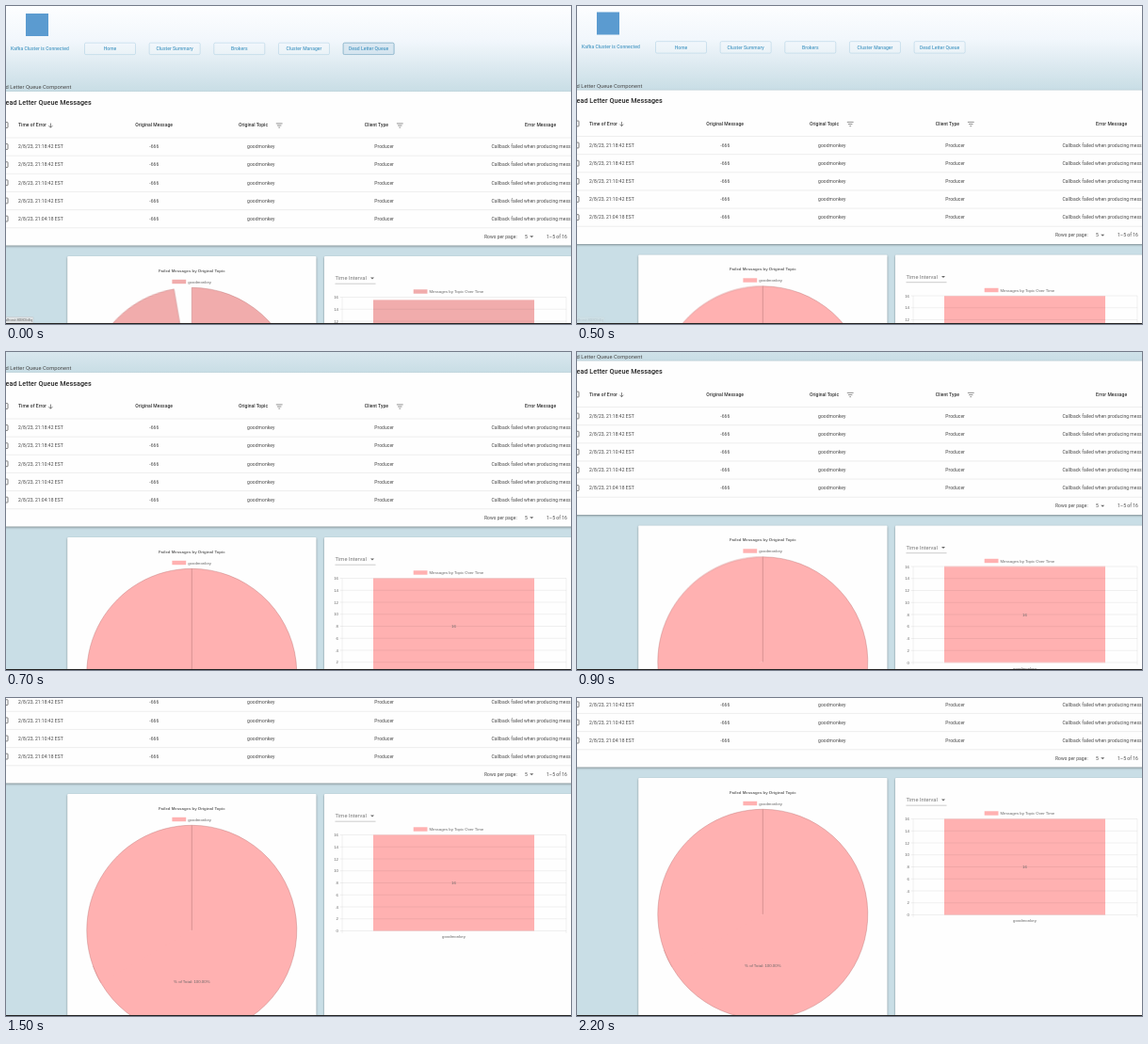
An HTML page for the animation above (4 s loop, 600 by 338 pixels).

```html
<!DOCTYPE html>
<html lang="en">
<head>
<meta charset="utf-8">
<title>Dead Letter Queue</title>
<style>
  html, body { margin: 0; width: 100%; height: 100%; overflow: hidden; background: #c9dee6; }
  svg { display: block; width: 100%; height: 100%; }
  text { font: 5px Roboto, sans-serif; letter-spacing: .04px; fill: #484848; }
  .strong { font-weight: 500; fill: #333; }
  .page-name { font-size: 5.78px; }
  .title { font-size: 7.23px; fill: #222; }
  .nav { fill: #4f9cc6; }
  .chart { font: 4.34px "Liberation Sans", Arial, sans-serif; letter-spacing: 0; fill: #666; }
  .chart.heading { font-weight: bold; }
  .select { font-size: 5.78px; letter-spacing: 0; fill: #777; }
  .card { fill: #fefefe; filter: drop-shadow(0 1px 1.3px rgba(0, 0, 0, .38)); }
  .button { fill: rgba(255, 255, 255, .12); stroke: #a9cce0; stroke-width: .5; }
  .outline { fill: none; stroke: #555; stroke-width: .75; }
  .edge { stroke: #b96c6c; stroke-width: .4; }

  .page, .tint, .bar, .slice, .hover, .status { animation: 4s step-end infinite; }
  .page { animation-name: scroll; }
  .tint { animation-name: tint; fill: #ffb1b1; }
  .bar { animation-name: tint, grow; transform-origin: 0 411.5px; }
  .slice { animation-name: tint, close; transform-origin: 197.3px 410.8px; }
  .hover { animation-name: hover; fill: rgba(70, 140, 185, .13); stroke: #7fa9bf; stroke-width: .6; }
  .status { animation-name: fade; }

  @keyframes scroll {
    0% { transform: translateY(0); }
    12.5% { transform: translateY(-1.5px); }
    15% { transform: translateY(-36px); }
    17.5% { transform: translateY(-69px); }
    20% { transform: translateY(-72px); }
    22.5% { transform: translateY(-81.5px); }
    25% { transform: translateY(-120px); }
    27.5% { transform: translateY(-144.5px); }
    32.5% { transform: translateY(-145.5px); }
    35% { transform: translateY(-152px); }
    37.5% { transform: translateY(-164px); }
    40% { transform: translateY(-177px); }
    42.5%, 100% { transform: translateY(-181px); }
  }
  @keyframes tint {
    0% { fill: #f1acac; }
    5%, 100% { fill: #ffb1b1; }
  }
  @keyframes grow {
    0% { transform: scaleY(.973); }
    2.5% { transform: scaleY(.991); }
    5% { transform: scaleY(.998); }
    7.5%, 100% { transform: scaleY(1); }
  }
  @keyframes close {
    0% { transform: rotate(-9.8deg); }
    2.5% { transform: rotate(-3.1deg); }
    5% { transform: rotate(-.6deg); }
    7.5%, 100% { transform: rotate(0deg); }
  }
  @keyframes hover {
    0% { opacity: 1; }
    5%, 100% { opacity: 0; }
  }
  @keyframes fade {
    0% { opacity: 1; }
    10% { opacity: .6; }
    12.5% { opacity: .2; }
    15%, 100% { opacity: 0; }
  }
</style>
</head>
<body>
<svg id="stage" viewBox="0 0 600 338" preserveAspectRatio="none"></svg>
<script>
const text = (x, y, label, cls = '', anchor = 'start') =>
  `<text x="${x}" y="${y}" class="${cls}" text-anchor="${anchor}">${label}</text>`;
const middle = (x, y, label, cls) => text(x, y, label, cls, 'middle');
const rect = (x, y, w, h, attrs = '') =>
  `<rect x="${x}" y="${y}" width="${w}" height="${h}" ${attrs}/>`;
const line = (x1, y1, x2, y2, color, width = .5) =>
  `<path d="M${x1} ${y1}L${x2} ${y2}" stroke="${color}" stroke-width="${width}"/>`;
const repeat = (count, draw) => Array.from({ length: count }, (_, i) => draw(i)).join('');

const caret = (x, y) => `<path d="M${x - 2} ${y - 1}h4l-2 2z" fill="#666"/>`;
const checkbox = y => rect(-4, y - 2.9, 6, 5.8, 'rx=".6" class="outline"');
const filterIcon = x =>
  line(x - 3.4, 124.9, x + 3.4, 124.9, '#777', .8) +
  line(x - 2.2, 127, x + 2.2, 127, '#777', .8) +
  line(x - .9, 129.1, x + .9, 129.1, '#777', .8);

function header() {
  const items = ['Home', 'Cluster Summary', 'Brokers', 'Cluster Manager', 'Dead Letter Queue'];
  const button = (i, cls) => rect(83.5 + 68.65 * i, 39.2, 54, 12.4, `rx="1.4" class="${cls}"`);
  return rect(0, 0, 600, 91, 'fill="url(#sky)"') +
    rect(21, 8, 24, 24, 'fill="#5b9bd0"') +
    text(5, 46.8, 'Kafka Cluster is Connected', 'strong nav') +
    items.map((label, i) =>
      button(i, 'button') + middle(110.5 + 68.65 * i, 47.2, label, 'strong nav')).join('') +
    button(4, 'hover') +
    text(69.3, 88.4, 'Dead Letter Queue Component', 'page-name', 'end');
}

function table() {
  const times = ['21:18:42', '21:18:42', '21:10:42', '21:10:42', '21:04:18'];
  const row = (time, i) => {
    const y = 149.5 + 19.15 * i, base = y + 1.8;
    return checkbox(y) +
      text(13, base, `2/8/23, ${time} EST`) +
      middle(157.3, base, '-666') +
      middle(270.7, base, 'goodmonkey') +
      middle(401.6, base, 'Producer') +
      text(515.5, base, 'Callback failed when producing message');
  };
  return rect(-10, 91, 620, 163.5, 'class="card"') +
    text(90.8, 104.8, 'Dead Letter Queue Messages', 'strong title', 'end') +
    checkbox(126.5) +
    text(13, 128.4, 'Time of Error', 'strong') +
    '<path d="M47.4 124.6v4.6m-2-2l2 2l2-2" class="outline"/>' +
    middle(157.2, 128.4, 'Original Message', 'strong') +
    middle(262.5, 128.4, 'Original Topic', 'strong') + filterIcon(290.2) +
    middle(393.4, 128.4, 'Client Type', 'strong') + filterIcon(418.3) +
    middle(567.6, 128.4, 'Error Message', 'strong') +
    repeat(6, i => line(0, 140 + 19.15 * i, 600, 140 + 19.15 * i, '#dcdcdc')) +
    times.map(row).join('') +
    text(508, 246.8, 'Rows per page:') +
    middle(552.5, 246.8, '5') + caret(558.2, 245.2) +
    text(574, 246.8, '1–5 of 16');
}

function pieCard() {
  const cx = 197.3, cy = 410.8, r = 111.5;
  const rim = degrees => {
    const a = degrees * Math.PI / 180;
    return `${cx + r * Math.sin(a)} ${cy - r * Math.cos(a)}`;
  };
  return rect(65.2, 266, 264.3, 320, 'rx="1" class="card"') +
    middle(cx, 282.5, 'Failed Messages by Original Topic', 'chart heading') +
    rect(176.4, 290.8, 14.8, 4.4, 'class="tint"') +
    text(193.2, 294.5, 'goodmonkey', 'chart') +
    `<path class="tint edge" d="M${cx} ${cy}L${rim(0)}A${r} ${r} 0 1 1 ${rim(250)}"/>` +
    `<path class="slice tint-shape edge" d="M${rim(240)}A${r} ${r} 0 0 1 ${rim(0)}L${cx} ${cy}"/>` +
    middle(cx, 467.4, '% of Total: 100.00%', 'chart');
}

function barCard() {
  const top = 309.5, step = 12.75, bottom = 411.5, grid = 'rgba(0,0,0,.12)';
  return rect(338, 266, 280, 320, 'rx="1" class="card"') +
    text(349.5, 291.4, 'Time Interval', 'select') + caret(389, 289.5) +
    line(349.5, 295.2, 392.5, 295.2, '#999') +
    rect(432.7, 301.3, 14.8, 4.4, 'class="tint"') +
    text(449.4, 305, 'Messages by Topic Over Time', 'chart') +
    rect(390, top, 171, bottom - top, 'class="bar"') +
    repeat(9, i => {
      const y = top + step * i;
      return line(354.5, y, 595, y, grid) + text(353, y + 1.5, 16 - 2 * i, 'chart', 'end');
    }) +
    line(357, top, 357, bottom + 2.5, grid) +
    line(595, top, 595, bottom + 2.5, grid) +
    middle(475.5, 362.2, '16', 'chart') +
    middle(475.5, 419.4, 'goodmonkey', 'chart');
}

const statusBar = `<g class="status">${
  rect(-4, 330.4, 33, 8, 'rx="1" fill="#dfe3e5" stroke="#b4bcc0" stroke-width=".4"') +
  text(28, 335.2, 'localhost:8080/dlq', 'chart', 'end')}</g>`;

document.getElementById('stage').innerHTML = `
  <defs>
    <linearGradient id="sky" x2="0" y2="1">
      <stop stop-color="#fdfeff"/>
      <stop offset=".4" stop-color="#f2f7fc"/>
      <stop offset="1" stop-color="#c8dde5"/>
    </linearGradient>
  </defs>
  <g class="page">${header() + table() + pieCard() + barCard()}</g>
  ${statusBar}
  ${rect(0, 337, 600, 1, 'fill="#222"')}`;
</script>
</body>
</html>
```
